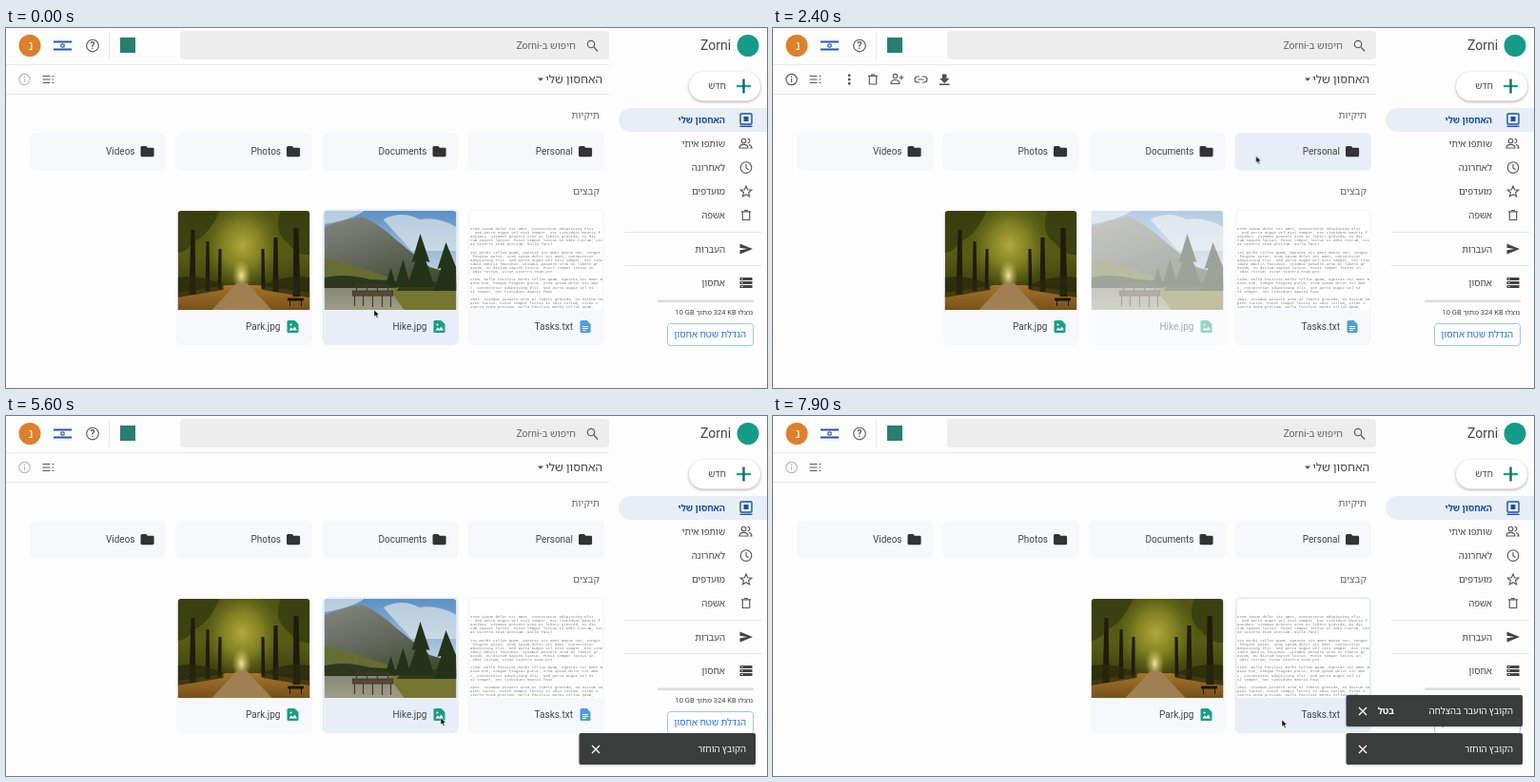
Animation, 800 px wide and 378 px high, one loop 8 s. Source, as an HTML page:

```html
<!DOCTYPE html>
<html lang="he">
<head>
<meta charset="utf-8">
<title>אחסון קבצים</title>
<style>
html, body { margin: 0; width: 100%; height: 100%; overflow: hidden; background: #fdfdfd; }
svg.stage { display: block; width: 800px; height: 378px; overflow: hidden; }
text { font: 10px Roboto, "Open Sans", "Noto Sans Hebrew", "Noto Sans", "DejaVu Sans", sans-serif; fill: #444; }
.he { direction: rtl; text-anchor: start; }
.side { font-size: 9.7px; }
.name { text-anchor: end; }
.line { fill: none; stroke: #585858; stroke-width: 1.15; }
.rule { stroke: #e8e8e8; }
.card { fill: #f6f8fc; }
.toast rect { fill: #393d3c; filter: drop-shadow(0 1px 1px #0003); }
.toast text { font-size: 9.5px; fill: #fff; }
.toast path { stroke: #fff; stroke-width: 1.3; }
.toast .undo { font-weight: 700; }
.lorem { font: 4px "Liberation Mono", "DejaVu Sans Mono", monospace; fill: #7c7c7c; white-space: pre; }

/* 1% of the loop is 80 ms */
.step { animation: 8s step-end infinite; }
.move { animation: 8s linear infinite; }
#pointer { animation-name: pointer; }
#ghost { animation-name: ghost; }
#tools { animation-name: tools; }
#info { animation-name: info; }
#hikeCard { animation-name: hikeCard; }
#parkCard { animation-name: parkCard; }
#personalBg { animation-name: personalBg; }
#documentsBg { animation-name: documentsBg; }
#hikeBg { animation-name: hikeBg; }
#parkBg { animation-name: parkBg; }
#tasksBg { animation-name: tasksBg; }
#moved { animation-name: moved; }
#restored { animation-name: restored; }
#movedAgain { animation-name: movedAgain; }
#undo { animation-name: undo; }

@keyframes pointer {
  0%, 9% { transform: translate(387px, 296px); }
  12.5% { transform: translate(398px, 280px); }
  18.5% { transform: translate(531px, 150px); }
  21.25% { transform: translate(541.5px, 143px); }
  26.25% { transform: translate(556px, 136px); }
  28.75% { transform: translate(540px, 135px); }
  35% { transform: translate(380px, 132px); }
  38.75%, 41.25% { transform: translate(360px, 131px); }
  53.75% { transform: translate(640px, 346px); }
  56%, 60% { transform: translate(643px, 348px); }
  67.5%, 71.5% { transform: translate(457px, 317px); }
  73.75% { transform: translate(465px, 290px); }
  79% { transform: translate(548px, 155px); }
  82.5% { transform: translate(568.5px, 141px); }
  84.5% { transform: translate(572px, 138px); }
  88.75% { transform: translate(390px, 165px); }
  92.5% { transform: translate(279px, 215px); }
  98.75%, 100% { transform: translate(535px, 319px); }
}
@keyframes ghost { 0% { opacity: 0 } 12.5% { opacity: 1 } 26.25% { opacity: 0 } 73.75% { opacity: 1 } 84.5% { opacity: 0 } }
@keyframes tools { 0% { opacity: 0 } 8.75% { opacity: 1 } 35% { opacity: 0 } 71.25% { opacity: 1 } 87.5% { opacity: 0 } }
@keyframes info { 0% { opacity: .4 } 8.75% { opacity: 1 } 35% { opacity: .4 } 71.25% { opacity: 1 } 87.5% { opacity: .4 } }
@keyframes hikeCard {
  0% { opacity: 1 } 12.5% { opacity: .45 } 32.5% { opacity: 0 }
  62.5% { opacity: 1 } 73.75% { opacity: .45 } 87.5% { opacity: 0 }
}
@keyframes parkCard {
  0% { transform: translate(178.5px, 190px) } 32.5% { transform: translate(332.5px, 190px) }
  62.5% { transform: translate(178.5px, 190px) } 87.5% { transform: translate(332.5px, 190px) }
}
@keyframes personalBg {
  0% { fill: #f6f8fc } 18.75% { fill: #dcdcdc } 26.25% { fill: #e8eef7 } 31.25% { fill: #f6f8fc }
  80% { fill: #dcdcdc } 84.5% { fill: #e8eef7 } 86.5% { fill: #f6f8fc }
}
@keyframes documentsBg { 0% { fill: #f6f8fc } 31.25% { fill: #e8eef7 } 42.5% { fill: #f6f8fc } }
@keyframes hikeBg { 0% { fill: #e8eef7 } 12.5% { fill: #f6f8fc } 66.25% { fill: #e8eef7 } 73.75% { fill: #f6f8fc } }
@keyframes parkBg { 0% { fill: #f6f8fc } 93.75% { fill: #e8eef7 } 97.25% { fill: #f6f8fc } }
@keyframes tasksBg { 0% { fill: #f6f8fc } 47% { fill: #e8eef7 } 52.5% { fill: #f6f8fc } 97.5% { fill: #e8eef7 } }
@keyframes moved {
  0%, 35% { transform: translateX(200px) } 37.5%, 62.5% { transform: none } 62.51%, 100% { transform: translateX(200px) }
}
@keyframes restored { 0%, 62.5% { transform: translateX(200px) } 65%, 100% { transform: none } }
@keyframes movedAgain { 0%, 88.75% { transform: translateX(200px) } 91.25%, 100% { transform: none } }
@keyframes undo { 0% { opacity: 1 } 57.5% { opacity: 0 } }
</style>
</head>
<body>
<svg class="stage" viewBox="0 0 800 378">
  <defs>
    <linearGradient id="sky" x2="0" y2="1"><stop stop-color="#5c8fc4"/><stop offset=".6" stop-color="#b9cfe0"/></linearGradient>
    <linearGradient id="slope" x2=".6" y2="1"><stop stop-color="#85867f"/><stop offset=".55" stop-color="#62685c"/><stop offset="1" stop-color="#424d30"/></linearGradient>
    <linearGradient id="lake" x2="0" y2="1"><stop stop-color="#7d8474"/><stop offset="1" stop-color="#a09c86"/></linearGradient>
    <linearGradient id="leaves" x2="0" y2="1"><stop stop-color="#4f5513"/><stop offset=".45" stop-color="#565c14"/><stop offset="1" stop-color="#2a2d0b"/></linearGradient>
    <linearGradient id="ground" x2="0" y2="1"><stop stop-color="#a4752a"/><stop offset="1" stop-color="#77501b"/></linearGradient>
    <radialGradient id="glow"><stop stop-color="#b3a93a"/><stop offset=".5" stop-color="#8c8a26" stop-opacity=".8"/><stop offset="1" stop-color="#6a6c18" stop-opacity="0"/></radialGradient>
    <radialGradient id="gap"><stop stop-color="#efe6a6"/><stop offset="1" stop-color="#c5b548" stop-opacity="0"/></radialGradient>
    <clipPath id="frame"><path d="M0 4a4 4 0 0 1 4-4h131a4 4 0 0 1 4 4v100H0z"/></clipPath>

    <path id="folder" d="M1.5 0h4.3l1.6 1.7h5.3q1.4 0 1.4 1.4v6.7q0 1.4-1.4 1.4H1.4Q0 11.2 0 9.8V1.5Q0 0 1.5 0z" fill="#333"/>
    <g id="picture">
      <path d="M1.5 0H8l4 4v7.5q0 1.5-1.5 1.5h-9Q0 13 0 11.5v-10Q0 0 1.5 0z" fill="#1c9c86"/>
      <path d="M2 10.5l2.3-3.3 1.8 2 2-2.7 2.3 4z" fill="#fff"/><circle cx="4" cy="4.5" r="1.1" fill="#fff"/>
    </g>
    <g id="doc">
      <path d="M1.5 0H7l4 4v7.5q0 1.5-1.5 1.5h-8Q0 13 0 11.5v-10Q0 0 1.5 0z" fill="#4f9aea"/>
      <path d="M2.5 6.5h6M2.5 8.500h6M2.5 10.5h4" stroke="#fff"/>
    </g>
    <path id="trash" class="line" d="M-3.7-3v8h7.4v-8M-5-3.7H5M-2-5h4"/>
    <g id="park" clip-path="url(#frame)">
      <path d="M0 0h139v104H0z" fill="url(#leaves)"/>
      <ellipse cx="68" cy="36" rx="42" ry="46" fill="url(#glow)"/>
      <ellipse cx="67" cy="68" rx="10" ry="17" fill="url(#gap)"/>
      <path d="M0 86l52-8h32l55 8v18H0z" fill="url(#ground)"/>
      <path d="M62 76h11l26 28H36z" fill="#a08052"/>
      <path d="M0 0h44Q34 24 18 32 8 44 0 44zM139 0h-31q-8 22 8 34 10 14 23 12z" fill="#2f350d" opacity=".65"/>
      <path d="M14 20h4l1 68h-7zM30 32h3l1 52h-5zM43 40h3v42h-4zM88 40h3l1 42h-4zM101 28h4l1 57h-6zM122 18h5l2 72h-8z" fill="#1f1c0d"/>
      <path d="M0 70q24-4 48 8v5L0 91zM139 70q-24-4-50 8v5l50 8z" fill="#27290c" opacity=".75"/>
      <path d="M116 92h16v2h-16zM118 94v6M130 94v6" fill="#1b170f" stroke="#1b170f"/>
    </g>
    <g id="hike" clip-path="url(#frame)">
      <path d="M0 0h139v104H0z" fill="url(#sky)"/>
      <path d="M0 0h42Q30 9 0 14zM62 9q20-10 38 0 20-3 39 8v25H92z" fill="#dde5ea" opacity=".7"/>
      <path d="M0 17Q20 9 40 6 58 14 75 30l36 29 28 8v14H0z" fill="url(#slope)"/>
      <path d="M0 50q30 5 54 15l34 11H0z" fill="#666d32"/>
      <path d="M0 75h139v29H0z" fill="url(#lake)"/>
      <path d="M0 70q22-5 48 2l40 2v7H0z" fill="#2d371e"/>
      <path d="M68 82q28-5 71-3v25H84z" fill="#767632"/>
      <path d="M84 74h55v10H76z" fill="#2f3b1c"/>
      <path d="M101 24l10 30-4-1 9 27H87l9-27-4 1zM128 33l11 27v24h-24l8-24-4 1zM83 51l8 29H74zM70 60l6 19H64z" fill="#24321a"/>
      <path d="M30 84h42v5H30zM32 89v11M41 89v11M51 89v12M61 89v12M70 89v12M33 78h35M34 78v6M45 78v6M56 78v6M67 78v6" fill="#544936" stroke="#443b2b" stroke-width="1.2"/>
    </g>
  </defs>

  <!-- header -->
  <path class="rule" d="M0 38.5h634M0 69.5h634M108.5 4v29"/>
  <circle cx="25" cy="18.500" r="11.5" fill="#dc802c"/>
  <text class="he" x="28.5" y="23" style="font-size:13px;fill:#fff">נ</text>
  <rect x="50" y="12" width="19" height="13" fill="#fff" stroke="#ddd" stroke-width=".5"/>
  <path d="M50 14.5h19M50 22.5h19" stroke="#2b55a8" stroke-width="2"/>
  <path d="M59.5 16l2.3 3.8h-4.6zM59.5 21l-2.3-3.8h4.6z" fill="none" stroke="#2b55a8" stroke-width=".7"/>
  <circle class="line" cx="91" cy="18.5" r="6.3"/>
  <text x="91" y="22" text-anchor="middle" style="font-weight:500">?</text>
  <rect x="120" y="10" width="16" height="16" fill="#287f70"/>
  <rect x="183" y="3" width="451" height="30" rx="4" fill="#ededed"/>
  <path class="line" d="M618 20l4 4.5"/><circle class="line" cx="615" cy="17" r="3.7"/>
  <text class="he" x="599" y="22" style="font-size:10.5px;fill:#666">חיפוש ב-Zorni</text>
  <text x="730" y="23" style="font-size:14px">Zorni</text>
  <circle cx="780" cy="18.5" r="11.5" fill="#169b89"/>

  <!-- toolbar -->
  <g id="info" class="step"><circle class="line" cx="19.500" cy="54" r="5.7"/><path class="line" d="M19.5 53v4M19.5 50.5v1.4"/></g>
  <path class="line" d="M38.5 50.5h8M38.5 54h8M38.5 57.5h8M48.5 50.5h1.800M48.5 54h1.8M48.5 57.5h1.8"/>
  <g id="tools" class="step">
    <path d="M79 48.5h2.4v2.4H79zM79 52.8h2.4v2.4H79zM79 57h2.4v2.4H79z" fill="#505050"/>
    <use href="#trash" x="105" y="54"/>
    <path class="line" d="M124 58.5q0-4 4.5-4t4.5 4zM132.5 52h5M135 49.5v5"/><circle class="line" cx="128.5" cy="50.5" r="2.2"/>
    <path class="line" d="M154 51h-2a3 3 0 0 0 0 6h2M157 51h2a3 3 0 0 1 0 6h-2M152.5 54h6"/>
    <path d="M178 48.5h4.5V53h3l-5.200 5-5.200-5h2.900zM175 58.5h10.5V60H175z" fill="#505050"/>
  </g>
  <path d="M559 52.5h6l-3 3.2z" fill="#505050"/>
  <text class="he" x="627" y="58" style="font-size:12px">האחסון שלי</text>
  <text class="he" x="624" y="95" style="font-size:10.4px;fill:#666">תיקיות</text>
  <text class="he" x="624" y="175" style="font-size:10.4px;fill:#666">קבצים</text>

  <!-- sidebar -->
  <rect x="718" y="46" width="75" height="30.5" rx="15.2" fill="#fff" style="filter:drop-shadow(0 1px 1.5px #0005)"/>
  <path d="M768 61h15" stroke="#1da48c" stroke-width="2.4"/><path d="M775.5 53.5v15" stroke="#17695e" stroke-width="2.4"/>
  <text class="he side" x="757" y="64" style="font-weight:500">חדש</text>
  <path d="M800 84H656.5a12.5 12.5 0 0 0 0 25H800z" fill="#e7eef6"/>
  <text class="he" x="756" y="100" style="font-size:9.3px;font-weight:700;fill:#1c50a4">האחסון שלי</text>
  <rect x="772" y="90" width="12" height="11" rx="1" fill="none" stroke="#1c50a4" stroke-width="1.4"/>
  <path d="M771.5 103.3h13" stroke="#1c50a4" stroke-width="1.4"/><rect x="775.5" y="93" width="5" height="5" fill="#1c50a4"/>
  <text class="he side" x="756" y="125">שותפו איתי</text>
  <text class="he side" x="756" y="150">לאחרונה</text>
  <text class="he side" x="756" y="175">מועדפים</text>
  <text class="he side" x="756" y="200">אשפה</text>
  <text class="he side" x="756" y="236">העברות</text>
  <text class="he side" x="756" y="271">אחסון</text>
  <circle class="line" cx="775.5" cy="118.5" r="2.3"/>
  <path class="line" d="M771 126q0-3.7 4.5-3.7t4.5 3.7zM779.5 116.2a2.3 2.3 0 0 1 0 4.6M781 122.5q3 .8 3 3.5h-2"/>
  <circle class="line" cx="778" cy="146.5" r="5.8"/><path class="line" d="M778 143v4l2.7 1.7"/>
  <path class="line" d="M778 166l1.6 3.8 4.2.3-3.2 2.7 1 4.1-3.6-2.2-3.6 2.2 1-4.1-3.2-2.7 4.2-.3z"/>
  <use href="#trash" x="778" y="196.5"/>
  <path d="M771.5 226.5l13.5 5.5-13.5 5.5v-4.3l8-1.2-8-1.2z" fill="#444"/>
  <path d="M771.5 262h13v3h-13zM771.5 266h13v3h-13zM771.5 270h13v3h-13z" fill="#444"/>
  <path d="M773 263.5h1.5M773 267.5h1.5M773 271.5h1.5" stroke="#fff"/>
  <path class="rule" d="M650 214.5h145M650 249.5h145"/>
  <rect x="685" y="285.5" width="101" height="2.5" rx="1" fill="#dcdcdc"/>
  <text class="he" x="785" y="301" style="font-size:7.5px">נוצלו &lrm;324 KB מתוך &lrm;10 GB</text>
  <rect x="695.5" y="310.5" width="90" height="23" rx="3" fill="#fff" stroke="#a3c3e8"/>
  <text class="he side" x="778" y="325" style="fill:#2270cc">הגדלת שטח אחסון</text>

  <!-- folders -->
  <g transform="translate(485.5 110)"><rect id="personalBg" class="card step" width="143.5" height="39.5" rx="6"/><use href="#folder" x="116.5" y="14"/><text class="name" x="110.5" y="23">Personal</text></g>
  <g transform="translate(332 110)"><rect id="documentsBg" class="card step" width="143.5" height="39.5" rx="6"/><use href="#folder" x="116.5" y="14"/><text class="name" x="110.5" y="23">Documents</text></g>
  <g transform="translate(178.5 110)"><rect class="card" width="143.5" height="39.5" rx="6"/><use href="#folder" x="116.5" y="14"/><text class="name" x="110.5" y="23">Photos</text></g>
  <g transform="translate(25 110)"><rect class="card" width="143.5" height="39.5" rx="6"/><use href="#folder" x="116.5" y="14"/><text class="name" x="110.5" y="23">Videos</text></g>

  <!-- files -->
  <g transform="translate(485.5 190)">
    <rect id="tasksBg" class="card step" width="143.5" height="143" rx="6"/>
    <path d="M2.500 6a4 4 0 0 1 4-4h131a4 4 0 0 1 4 4v100h-139z" fill="#fff"/>
    <svg x="2.5" y="2" width="139" height="104"><g id="page"></g></svg>
    <use href="#doc" x="118" y="117"/><text class="name" x="110.5" y="127">Tasks.txt</text>
  </g>
  <g id="hikeCard" class="step">
    <g transform="translate(332.5 190)">
      <rect id="hikeBg" class="card step" width="143.5" height="143" rx="6"/>
      <use href="#hike" x="2" y="2"/><use href="#picture" x="117" y="117"/>
      <text class="name" x="110" y="127">Hike.jpg</text>
    </g>
  </g>
  <g id="parkCard" class="step">
    <rect id="parkBg" class="card step" width="143.5" height="143" rx="6"/>
    <use href="#park" x="2" y="2"/><use href="#picture" x="117" y="117"/>
    <text class="name" x="110" y="127">Park.jpg</text>
  </g>

  <!-- messages -->
  <g id="moved" class="toast move">
    <rect x="602.5" y="333" width="185.5" height="33" rx="2"/>
    <text class="he" x="778" y="353">הקובץ הועבר בהצלחה</text>
    <g id="undo" class="step"><text class="he undo" x="653" y="353">בטל</text></g>
    <path d="M616 346l8 8m0-8l-8 8"/>
  </g>
  <g id="restored" class="toast move">
    <rect x="602.5" y="333" width="185.5" height="33" rx="2"/>
    <text class="he" x="778" y="353">הקובץ הוחזר</text>
    <path d="M616 346l8 8m0-8l-8 8"/>
  </g>
  <g id="movedAgain" class="toast move">
    <rect x="602.5" y="293" width="185.5" height="33" rx="2"/>
    <text class="he" x="778" y="313">הקובץ הועבר בהצלחה</text>
    <text class="he undo" x="653" y="313">בטל</text>
    <path d="M616 306l8 8m0-8l-8 8"/>
  </g>

  <!-- pointer with the dragged file -->
  <g id="pointer" class="move">
    <g id="ghost" class="step">
      <rect x="-157.5" y="1" width="158" height="31.5" rx="3" fill="#e8eef7" style="filter:drop-shadow(0 1px 1px #0006)"/>
      <use href="#picture" transform="translate(-23.5 12) scale(.93)"/>
      <text class="name" x="-30.5" y="21" style="font-size:9px;fill:#1f5bb0">Hike.jpg</text>
    </g>
    <path d="M0 0v7.2l1.7-1.4 1.2 2.7 1.3-.6L3 5.3l2.300-.2z" fill="#111" stroke="#fff" stroke-width=".5"/>
  </g>
</svg>
<script>
const lorem = "orem ipsum dolor sit amet, consectetur adipiscing elit. Sed porta augue vel nisi semper, nec tincidunt mauris faucibus. Vivamus posuere urna at libero gravida, eu dictum sapien luctus. Fusce tempor lectus in odio rutrum, vitae viverra enim pretium. Nulla facilisi morbi tellus quam, egestas sit amet massa non, congue feugiat purus. ";
const paragraphs = [5, 6, 4, 4];
const page = document.getElementById("page");
let row = 0, at = 0;
for (const count of paragraphs) {
  for (let i = 0; i < count; i++, row++) {
    const line = document.createElementNS("http://www.w3.org/2000/svg", "text");
    const length = i === count - 1 ? 36 : 54 + (row * 3) % 5;
    line.setAttribute("class", "lorem");
    line.setAttribute("y", 20 + row * 4.1);
    line.textContent = (lorem + lorem).substr(at, length);
    at = (at + length) % lorem.length;
    page.append(line);
  }
  row++;
}
</script>
</body>
</html>
```
